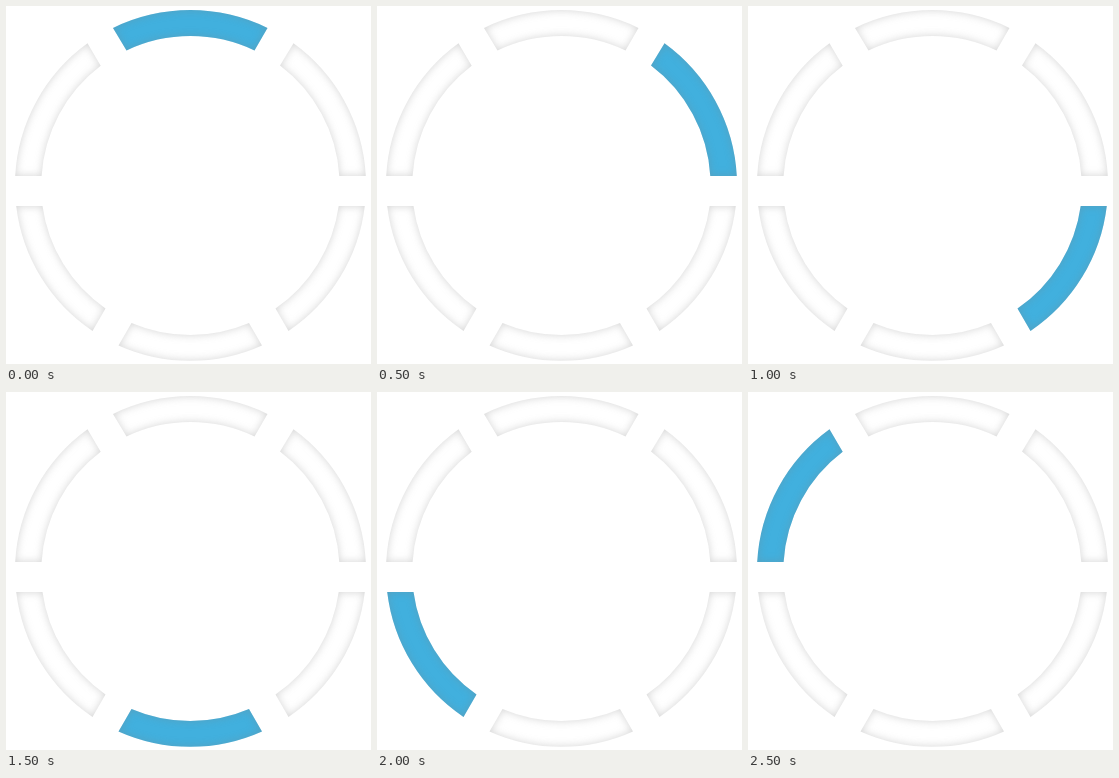
Write an HTML page that moves like this. It is 365 px wide and 358 px high and loops after 3000 ms.

```html
<!DOCTYPE html>
<html lang="en">
<head>
<meta charset="utf-8">
<title>Ring loader</title>
<style>
  html, body { margin: 0; width: 100%; height: 100%; overflow: hidden; background: #fff; }
  svg { display: block; width: 365px; height: 358px; }
  path {
    fill: #fff;
    filter: url(#inset);
    animation: light 3s step-end infinite;
    animation-delay: calc((var(--i) - 6) * .5s);
  }
  @keyframes light {
    0% { fill: #41b0de; }
    16.6667%, 100% { fill: #fff; }
  }
</style>
</head>
<body>
<svg viewBox="0 0 365 358">
  <defs>
    <!-- soft grey shade along the inside of each edge -->
    <filter id="inset" filterUnits="userSpaceOnUse" x="-20" y="-20" width="405" height="398" color-interpolation-filters="sRGB">
      <feFlood flood-color="#808080" flood-opacity=".34"/>
      <feComposite in2="SourceAlpha" operator="out"/>
      <feGaussianBlur stdDeviation="4"/>
      <feComposite in2="SourceAlpha" operator="in" result="shade"/>
      <feMerge>
        <feMergeNode in="SourceGraphic"/>
        <feMergeNode in="shade"/>
      </feMerge>
    </filter>
  </defs>
  <path style="--i:0" d="M107 22A175.5 175.5 0 0 1 261.5 22L248.5 44.5A149.5 149.5 0 0 0 120.5 44.5Z"/>
  <path style="--i:1" d="M287.5 37.3A175.5 175.5 0 0 1 359.8 170H333.3A149.5 149.5 0 0 0 274 59.5Z"/>
  <path style="--i:2" d="M358.8 200A175.5 175.5 0 0 1 282.5 325L269.5 302.5A149.5 149.5 0 0 0 332.7 200Z"/>
  <path style="--i:3" d="M256 339.5A175.5 175.5 0 0 1 112.5 339.5L125.5 317A149.5 149.5 0 0 0 243 317Z"/>
  <path style="--i:4" d="M86.5 325A175.5 175.5 0 0 1 10.2 200H36.5A149.5 149.5 0 0 0 99.5 302.5Z"/>
  <path style="--i:5" d="M9.2 170A175.5 175.5 0 0 1 81.5 37.3L94.7 59.8A149.5 149.5 0 0 0 35.6 170Z"/>
</svg>
</body>
</html>
```
